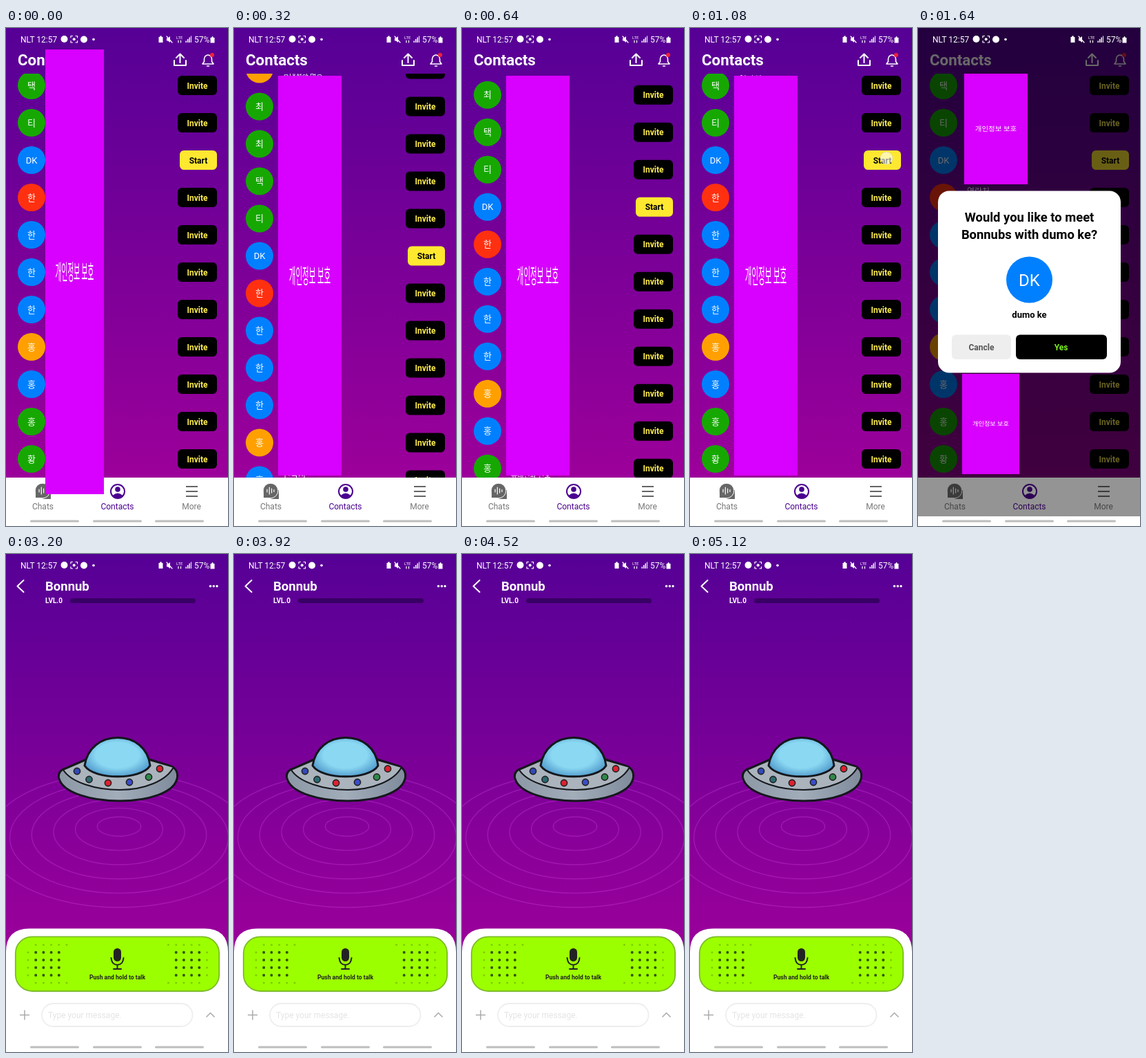
Recreate the animation shown at these times as an HTML page. Size 322 px wide and 720 px high, loop 5160 ms.

```html
<!DOCTYPE html>
<html lang="en">
<head>
<meta charset="utf-8">
<title>Contacts to chat</title>
<style>
html, body { margin: 0; width: 100%; height: 100%; overflow: hidden; background: #fff; }
svg { display: block; width: 322px; height: 720px; font-family: Roboto, "Noto Sans CJK KR", sans-serif; }
.b { font-weight: 700; }
.m { text-anchor: middle; }
.w { fill: #fff; }
.line { fill: none; stroke: #fff; stroke-width: 2; stroke-linecap: round; stroke-linejoin: round; }
.thin { stroke-width: 1.2; }
</style>
</head>
<body>
<svg viewBox="0 0 322 720">
  <defs>
    <linearGradient id="sky" x2="0" y2="1">
      <stop offset="0" stop-color="#560096"/>
      <stop offset="1" stop-color="#9c009a"/>
    </linearGradient>
    <radialGradient id="glass" cy=".45" r=".6">
      <stop offset=".55" stop-color="#8ad8f2"/>
      <stop offset="1" stop-color="#4a93c8"/>
    </radialGradient>
    <linearGradient id="hull">
      <stop offset="0" stop-color="#8d98a6"/>
      <stop offset=".5" stop-color="#a2adba"/>
      <stop offset="1" stop-color="#7f8b9b"/>
    </linearGradient>
    <clipPath id="view"><rect y="66" width="322" height="584"/></clipPath>
  </defs>

  <g id="contacts">
    <rect width="322" height="650" fill="url(#sky)"/>
    <text class="b w" x="17" y="54" font-size="22.3">Contacts</text>
    <path class="line" d="M244 47v7h17v-7M252.500 50V38M247 43l5.500-5.500 5.500 5.500"/>
    <path class="line" style="stroke-width:1.600" d="M285 52h16l-2.500-3.500V45a5.500 6 0 0 0-11 0v3.500zM291.500 55h3"/>
    <circle cx="299" cy="39" r="3" fill="#f0203a"/>
    <g clip-path="url(#view)"><g id="list"></g></g>
    <rect y="650" width="322" height="70" fill="#fff"/>
    <g fill="#666">
      <path d="M58 668h7v13h-8q-6 0-8-5z"/>
      <circle cx="53" cy="669" r="10.800" stroke="#fff"/>
      <path d="M43 669v10h9z"/>
    </g>
    <path class="line thin" d="M48 667v4M51.300 664v10M54.600 666v6M58 667.500v3"/>
    <g fill="#4b0090">
      <circle cx="162" cy="670" r="10" fill="none" stroke="#4b0090" stroke-width="2"/>
      <circle cx="162" cy="667" r="3.800"/>
      <path d="M154.500 676q7.500-7 15 0-7.500 7-15 0z"/>
    </g>
    <path d="M261 663h17M261 670h17M261 677h17" stroke="#666" stroke-width="1.800"/>
    <g class="m" font-size="12" fill="#777">
      <text x="53.500" y="696">Chats</text>
      <text x="161.500" y="696" fill="#4b0090">Contacts</text>
      <text x="269" y="696">More</text>
    </g>
    <g id="shade">
      <rect width="322" height="650" opacity=".59"/>
      <rect y="650" width="322" height="56" opacity=".42"/>
    </g>
    <g id="masks"></g>
    <circle id="touch" cx="285" cy="188" r="9" fill="#fff" fill-opacity=".6" stroke="#ccc" stroke-opacity=".5"/>
    <g id="dialog" class="b m">
      <rect x="29" y="235.500" width="265" height="263" rx="16" fill="#fff"/>
      <text x="161.500" y="280" font-size="18.400">Would you like to meet</text>
      <text x="161.500" y="305" font-size="18.400">Bonnubs with dumo ke?</text>
      <circle cx="161.500" cy="364" r="33.500" fill="#0080ff"/>
      <text class="w" x="161.500" y="373" font-size="24" font-weight="400">DK</text>
      <text x="161.500" y="418.500" font-size="13">dumo ke</text>
      <rect x="49" y="443.500" width="86" height="35.500" rx="6" fill="#eee"/>
      <text x="92" y="465.500" font-size="12" fill="#555">Cancle</text>
      <rect x="142" y="443.500" width="132" height="35.500" rx="6"/>
      <text x="207.500" y="465.500" font-size="12" fill="#7cf020">Yes</text>
    </g>
  </g>

  <g id="chat">
    <rect width="322" height="720" fill="#fff"/>
    <rect width="322" height="580" fill="url(#sky)"/>
    <path class="line" d="M25.500 38l-9 8.500 9 8.500"/>
    <text class="b w" x="57" y="53" font-size="18.500">Bonnub</text>
    <g class="w">
      <circle cx="296.500" cy="46.500" r="1.700"/><circle cx="301.300" cy="46.500" r="1.700"/><circle cx="306" cy="46.500" r="1.700"/>
    </g>
    <text class="b w" x="57" y="71" font-size="10">LVL.0</text>
    <rect x="93" y="64" width="182" height="7" rx="3.500" fill="#380064"/>
    <g id="rings" fill="none" stroke="#d44ae6" stroke-opacity=".32" stroke-width="1.400"></g>
    <g stroke="#15171c" stroke-width="3" stroke-linejoin="round">
      <path fill="url(#hull)" d="M86 310Q75 314 76.500 323C81 346 126 357 165 357S245 346 248.500 323Q250 312 240 307L205 296H118Z"/>
      <path fill="#abb4bd" stroke-width="2" d="M83 312C94 330 130 341 165 341S233 328 243 308L205 297H118Z"/>
      <path fill="url(#glass)" d="M114 306C118 280 138 265.500 162 265.500S206 280 209 306C196 327 128 327 114 306Z"/>
    </g>
    <g id="lights" stroke="#222" stroke-width="1.600"></g>
    <path fill="#fff" d="M0 720V575.500Q0 541.500 34 541.500H288Q322 541.500 322 575.500V720Z"/>
    <rect x="13.800" y="553.300" width="295.400" height="78.700" rx="24" fill="#9cff00" stroke="#7cbc28" stroke-width="1.800"/>
    <g id="dots"></g>
    <rect x="156" y="570" width="11" height="19" rx="5.500" fill="#222"/>
    <path class="line" style="stroke:#222" d="M152.500 584q1 10 9 10t9-10M161.500 594v6M156 600h11"/>
    <text class="b m" x="161.500" y="615" font-size="8.600" fill="#222">Push and hold to talk</text>
    <path d="M20 666.500h14M27 659.500v14" stroke="#aaa" stroke-width="1.500"/>
    <rect x="52" y="650" width="218.500" height="33" rx="16.500" fill="#fff" stroke="#eee" stroke-width="1.800"/>
    <text x="61" y="670.500" font-size="12" fill="#e4e4e4">Type your message.</text>
    <path d="M290.500 669.500l6-6 6 6" fill="none" stroke="#aaa" stroke-width="1.500"/>
  </g>

  <g class="w" id="status">
    <text x="21" y="20.500" font-size="12">NLT 12:57</text>
    <circle cx="84.500" cy="16" r="5"/>
    <path class="line thin" d="M94 14v-2.500h2.500M101 11.500h2.500V14M103.500 18.500V21H101M96.500 21H94v-2.500"/>
    <circle cx="98.700" cy="16.300" r="2"/>
    <circle cx="113" cy="16.500" r="5"/>
    <circle cx="127" cy="16.500" r="1.800"/>
    <path d="M221.500 13h1.700v-1.500h2.600V13h1.700v8h-6z"/>
    <path d="M233 14.500h2l3-2.500v9l-3-2.500h-2z"/>
    <path class="line thin" d="M233 12l8 9"/>
    <text x="247" y="16" font-size="6">LTE</text>
    <path class="line thin" d="M250 18v3M253.500 21v-3"/>
    <path d="M260.500 18.500h1.500V21h-1.500zM263 16h1.500v5H263zM265.500 13.500h1.500V21h-1.500zM268 11.500h1V21h-1z"/>
    <text x="273" y="20.500" font-size="12">57%</text>
    <path d="M296.500 14h1.500q1.500-4 3 0h1.500v7.500h-6z"/>
  </g>
  <path d="M36.500 713h68M127.500 713h68M217.500 713h68" stroke="#bdbdbd" stroke-width="3" stroke-linecap="round"/>
</svg>
<script>
const LOOP = 5160;
const $ = id => document.getElementById(id);
const GREEN = '#16a800', BLUE = '#0080ff', RED = '#ff3010', ORANGE = '#ffa000';

// Rows above the first visible one come into view while scrolling.
const rows = [
  ['정', GREEN], ['조', ORANGE], ['최', GREEN], ['최', GREEN], ['택', GREEN], ['티', GREEN], ['DK', BLUE], ['한', RED],
  ['한', BLUE], ['한', BLUE], ['한', BLUE], ['홍', ORANGE], ['홍', BLUE], ['홍', GREEN], ['황', GREEN]
];
$('list').innerHTML = rows.map(([label, color], i) => {
  const y = 83 + 54 * (i - 4), start = label === 'DK', x = start ? 252 : 249;
  return `<circle cx="37" cy="${y}" r="20" fill="${color}"/>
    <text class="m w" x="37" y="${y + 4.5}" font-size="13">${label}</text>
    <text class="w" x="71" y="${y - 4}" font-size="12">연락처</text>
    <text class="w" x="71" y="${y + 13}" font-size="10">휴대전화 번호</text>
    <rect x="${x}" y="${y - 14}" width="${306 - x}" height="28" rx="6" fill="${start ? '#ffe830' : '#000'}"/>
    <text class="b m" x="${(x + 306) / 2}" y="${y + 4.5}" font-size="12" fill="${start ? '#000' : '#ffee50'}">${start ? 'Start' : 'Invite'}</text>`;
}).join('');

// Each cover is one drawing whose caption is stretched along with it.
const cover = (x, y, x2, y2, size, tall) => `<g>
  <rect x="${x}" y="${y}" width="${x2 - x}" height="${y2 - y}" fill="#d800ff"/>
  <text class="m w" transform="translate(${(x + x2) / 2} ${(y + y2) / 2}) scale(1 ${tall})" y="${size * 0.36}" font-size="${size}">개인정보 보호</text></g>`;
$('masks').innerHTML = [
  cover(57, 31, 142, 674, 9.7, 3.2),
  cover(64, 69, 156, 647, 10.5, 2.8),
  cover(67, 66, 159, 226, 10.5, 0.9) + cover(64, 500, 147, 645, 9.2, 0.9)
].map(c => `<g>${c}</g>`).join('');
const masks = [...$('masks').children];

$('rings').innerHTML = [1, 2, 3, 4, 5, 6].map(n =>
  `<ellipse cx="164" cy="${390 + 4 * n}" rx="${31.7 * n}" ry="${14 + 16.6 * (n - 1)}"/>`).join('');

$('lights').innerHTML = [
  [103, 314, '#3448b8'], [120.5, 326, '#2a6a70'], [148, 331, '#e02030'],
  [179, 330, '#3a4cc8'], [207, 322.5, '#2f8a48'], [223, 310.5, '#e02030']
].map(([x, y, c]) => `<circle cx="${x}" cy="${y}" r="4.600" fill="${c}"/>`).join('');

let dots = '';
for (let c = 0; c < 6; c++) for (let r = 0; r < 6; r++) {
  const edgeRow = r === 0 || r === 5, edgeCol = c === 0 || c === 5;
  if (edgeRow ? c === 0 : c === 5) continue;
  const x = 32 + 11.2 * c, y = 565 + 11 * r, faint = edgeRow || edgeCol;
  for (const cx of [x, 323.5 - x])
    dots += `<circle cx="${cx}" cy="${y}" r="${faint ? 1.6 : 2}" fill="${faint ? '#7fd000' : '#34520a'}"/>`;
}
$('dots').innerHTML = dots;

const ramp = (t, a, b) => {
  const p = Math.min(1, Math.max(0, (t - a) / (b - a)));
  return p * p * (3 - 2 * p);
};
const show = (el, on) => el.style.display = on ? '' : 'none';

function draw(t) {
  const scroll = 158 * (ramp(t, 40, 400) - ramp(t, 400, 840));
  const modal = ramp(t, 1200, 1360);
  $('list').setAttribute('transform', `translate(0 ${scroll})`);
  const stage = t < 40 ? 0 : t < 1240 ? 1 : 2;
  masks.forEach((m, i) => show(m, i === stage));
  $('touch').setAttribute('opacity', ramp(t, 920, 1000) - ramp(t, 1140, 1220));
  $('shade').setAttribute('opacity', modal);
  $('dialog').setAttribute('opacity', modal);
  $('chat').setAttribute('opacity', ramp(t, 2280, 2380));
  show($('chat'), t >= 2280);
}

const begin = performance.now();
function tick() {
  draw((performance.now() - begin) % LOOP);
  requestAnimationFrame(tick);
}
tick();
</script>
</body>
</html>
```
